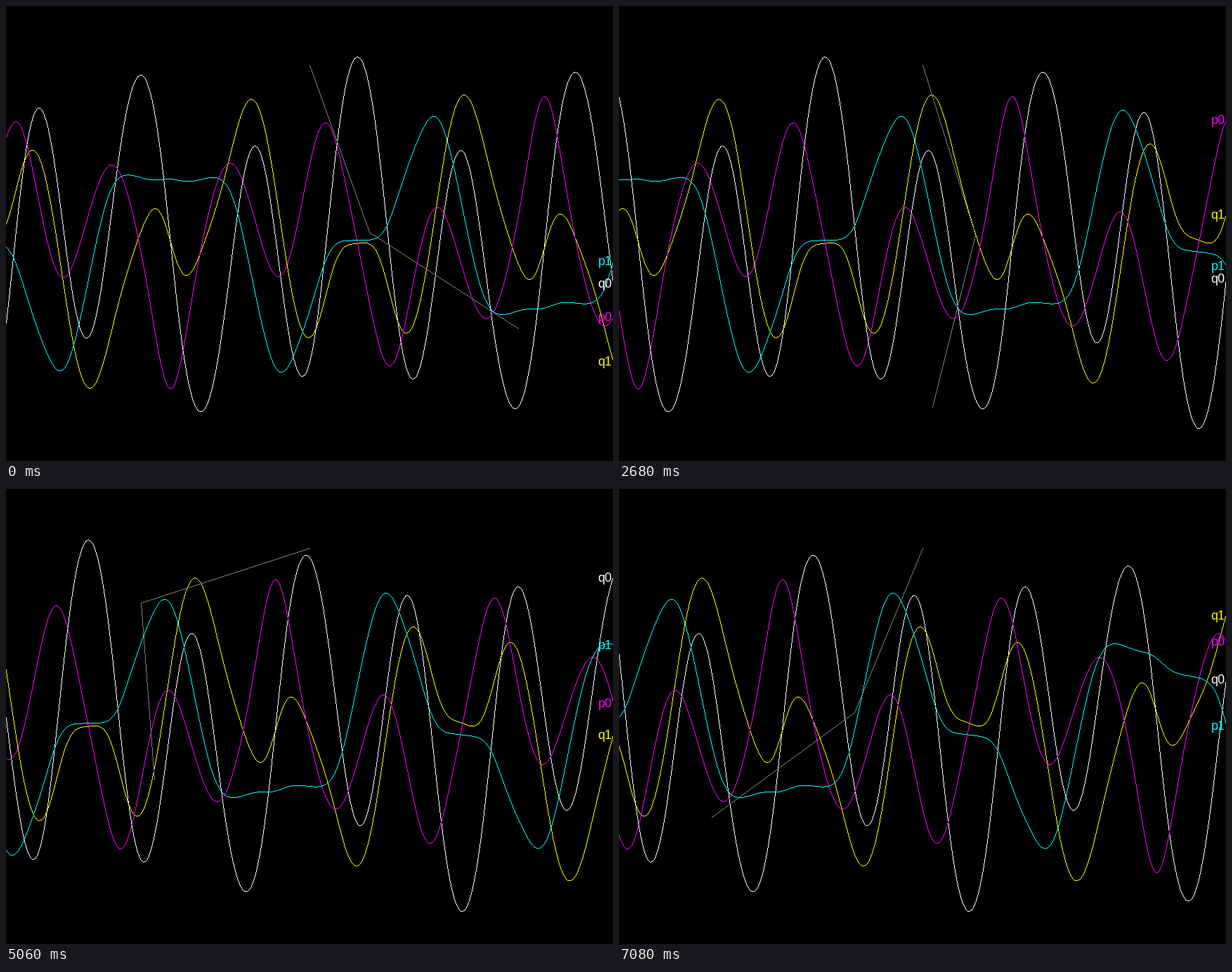
A matplotlib script for the animation above (7.16 s loop, 864 by 648 pixels).

```python
import numpy as np
import matplotlib.pyplot as plt
from matplotlib.animation import FuncAnimation

W, H, DPI = 864, 648, 100
PX = 72 / DPI                       # one pixel in points
LOOP, TICK = 7160, 20
ROD = 0.39 * H
PIVOT = (W / 2, 0.13 * H)
ZERO = PIVOT[1] + ROD               # height of value 0
UNIT = ROD / 1.5                    # pixels per unit of angle or momentum
COLORS = {"q0": (255, 255, 255), "q1": (255, 255, 0),
          "p0": (255, 0, 255), "p1": (0, 255, 255)}
GRAY = (128, 128, 128)


def flow(state):
    """Hamilton's equations for
    H = p0^2 + p1^2/2 + p0 p1 cos(q0 - q1) - cos q0 - cos q1."""
    q0, q1, p0, p1 = state
    c, s = np.cos(q0 - q1), np.sin(q0 - q1)
    return np.array([2 * p0 + p1 * c, p1 + p0 * c,
                     p0 * p1 * s - np.sin(q0), -p0 * p1 * s - np.sin(q1)])


def simulate(state, dt, count):
    out = [np.array(state, float)]
    for _ in range(count):
        y = out[-1]
        a = flow(y)
        b = flow(y + dt / 2 * a)
        c = flow(y + dt / 2 * b)
        d = flow(y + dt * c)
        out.append(y + dt / 6 * (a + 2 * b + 2 * c + d))
    return np.array(out)


def line(img, start, end, color):
    """One-pixel line without smoothing."""
    (x0, y0), (x1, y1) = np.rint(start).astype(int), np.rint(end).astype(int)
    n = max(abs(x1 - x0), abs(y1 - y0), 1)
    k = np.arange(n + 1) / n
    xs = np.floor(x0 + k * (x1 - x0) + 0.5).astype(int)
    ys = np.floor(y0 + k * (y1 - y0) + 0.5).astype(int)
    img[np.clip(ys, 0, H - 1), np.clip(xs, 0, img.shape[1] - 1)] = color


# Released at rest with the upper rod level and the lower one hanging
DT = 0.01
path = simulate([np.pi / 2, 0, 0, 0], DT, 4800)
times = DT * np.arange(len(path))

# Columns at which some swings of the upper rod turn set the paper speed
way = np.sign(np.diff(path[:, 0]))
turns = times[1:-1][way[1:] != way[:-1]]
swing, column = [3, 7, 11, 14, 18], [191, 500, 810, 1031.5, 1343.5]
speed, first = np.polyfit(turns[np.array(swing) - 1], column, 1)

# The picture advances in short runs of even beats: start -> count
BEAT = 78
RUNS = {0: 1, 120: 1, 270: 2, 570: 1, 800: 9, 1520: 1, 1670: 3, 1980: 5,
        2450: 6, 3060: 16, 4370: 8, 5060: 1, 5290: 1, 5450: 3, 5830: 5,
        6290: 7, 6920: 3}
steps = np.array([start + BEAT * k for start, count in RUNS.items()
                  for k in range(count)])
scroll = np.interp(steps, [0, 120, 1520, 2680, 3450, 4370, 5830, 7080],
                   [0, 18, 123, 207, 263, 331, 441, 534])
scroll = np.rint(scroll).astype(int)

# The whole strip of paper, drawn once
cols = np.arange(W + scroll[-1] + 1)
values = {name: np.interp((cols - first) / speed, times, path[:, i])
          for i, name in enumerate(COLORS)}
strip = np.zeros((H, len(cols), 3), np.uint8)
for name, color in COLORS.items():
    points = np.column_stack([cols, ZERO + UNIT * values[name]])
    for start, end in zip(points[:-1], points[1:]):
        line(strip, start, end, color)

fig = plt.figure(figsize=(W / DPI, H / DPI), dpi=DPI, facecolor="black")
ax = fig.add_axes([0, 0, 1, 1])
ax.axis("off")
view = ax.imshow(strip[:, :W], aspect="auto", interpolation="nearest",
                 extent=(-0.5, W - 0.5, H - 0.5, -0.5))
labels = {name: ax.text(842, 0, name, color=np.array(color) / 255,
                        fontsize=18 * PX, family="Liberation Sans",
                        va="baseline")
          for name, color in COLORS.items()}


def draw(n):
    t = n * TICK + TICK / 2
    s = scroll[np.searchsorted(steps, t, "right") - 1]
    now = {name: v[s + W] for name, v in values.items()}
    frame = strip[:, s:s + W].copy()
    joint = np.array(PIVOT)
    for name in ("q0", "q1"):
        tip = joint + ROD * np.array([np.sin(now[name]), np.cos(now[name])])
        line(frame, joint, tip, GRAY)
        joint = tip
    view.set_data(frame)
    for name, label in labels.items():
        label.set_y(ZERO + UNIT * now[name] + 6)
    return [view, *labels.values()]


anim = FuncAnimation(fig, draw, frames=LOOP // TICK, interval=TICK,
                     init_func=lambda: draw(0), repeat=True, repeat_delay=0)
plt.show()
```
